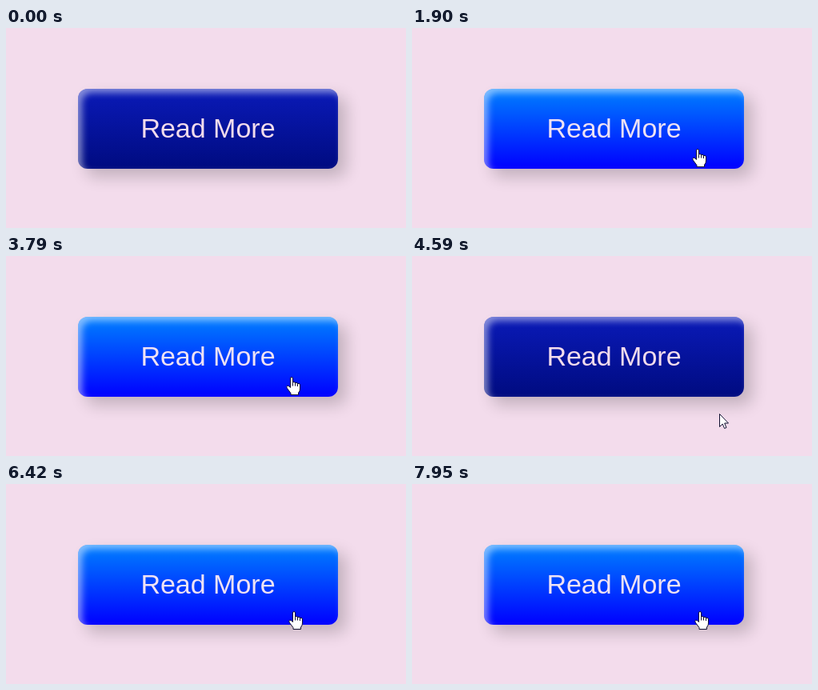
An HTML page for the animation above (8 s loop, 500 px wide and 250 px high).

```html
<!DOCTYPE html>
<html lang="en">
<head>
<meta charset="utf-8">
<title>Read More button</title>
<style>
  html, body { margin: 0; width: 100%; height: 100%; overflow: hidden; background: #f3dcec; }
  #stage { position: relative; width: 500px; height: 250px; overflow: hidden; }
  #button {
    position: absolute; left: 90px; top: 76px; width: 325px; height: 100px;
    border-radius: 12px;
    background: linear-gradient(#0a1ab8, #000b80);
    --bevel: inset 5px 5px 8px rgba(255, 255, 255, .5);
    box-shadow: var(--bevel), 10px 10px 20px rgba(0, 0, 0, .2);
    color: #f3dcec;
    font: 34px/98px "Liberation Sans", Arial, sans-serif;
    text-align: center;
  }
  #button.hover { background: linear-gradient(#0080ff, #0000ff); color: #f0e2f4; }
  #button.pressed { --bevel: inset -5px -5px 8px rgba(255, 255, 255, .5); }
  svg { position: absolute; left: 0; top: 0; }
</style>
</head>
<body>
<div id="stage">
  <div id="button">Read More</div>
  <svg width="500" height="250" viewBox="0 0 500 250">
    <g id="cursor" fill="#fff" stroke="#101030" stroke-width="1" stroke-linejoin="round">
      <path id="arrow" d="M.5 .5V16.5L4.2 13L6.6 18.5L9 17.5L6.7 12H11.5Z"/>
      <g id="hand">
        <path d="M-1.5 1Q-1.5 -.5 0 -.5Q1.5 -.5 1.5 1V6.5Q1.5 5.5 3 5.5Q4.5 5.5 4.5 7Q4.5 6.3 6 6.3Q7.5 6.3 7.5 8Q7.5 7.4 9 7.4Q10.5 7.6 10.5 9V14Q10.5 17 8.5 19V21.5H-1V19.5L-5.5 13.5Q-7 11 -5.2 10.2Q-3.8 9.8 -1.5 12.5Z"/>
        <path d="M1.5 6.5V10.5M4.5 7V10.5M7.5 8V11" fill="none"/>
      </g>
    </g>
  </svg>
</div>
<script>
const LOOP = 8000;
const $ = id => document.getElementById(id);
const button = $("button"), cursor = $("cursor"), arrow = $("arrow"), hand = $("hand");

const easeOut = p => 1 - Math.pow(1 - p, 2.4);
const easeInOut = p => p * p * (3 - 2 * p);

const moves = [
  { start: 440, end: 590, from: [431, 247], to: [414, 230], ease: easeOut },
  { start: 1340, end: 1900, from: [414, 230], to: [357, 152], ease: easeInOut },
  { start: 4410, end: 5020, from: [357, 152], to: [405, 231], ease: easeOut },
  { start: 5660, end: 6420, from: [405, 231], to: [360, 160], ease: easeInOut }
];
const presses = [[3080, 3790], [6730, 7250], [7850, 7950]];

function pointerAt(t) {
  const move = moves.filter(m => t >= m.start).pop();
  if (!move) return null;
  const p = move.ease(Math.min(1, (t - move.start) / (move.end - move.start)));
  return move.from.map((v, i) => Math.round(v + (move.to[i] - v) * p));
}

function render(t) {
  const pos = pointerAt(t);
  const over = !!pos && pos[0] < 415 && pos[1] < 176;
  button.classList.toggle("hover", over);
  button.classList.toggle("pressed", presses.some(([a, b]) => t >= a && t < b));
  cursor.style.display = pos ? "" : "none";
  arrow.style.display = over ? "none" : "";
  hand.style.display = over ? "" : "none";
  if (pos) cursor.setAttribute("transform", `translate(${pos})`);
}

const begin = performance.now();
function tick() {
  render((performance.now() - begin) % LOOP);
  requestAnimationFrame(tick);
}
tick();
</script>
</body>
</html>
```
